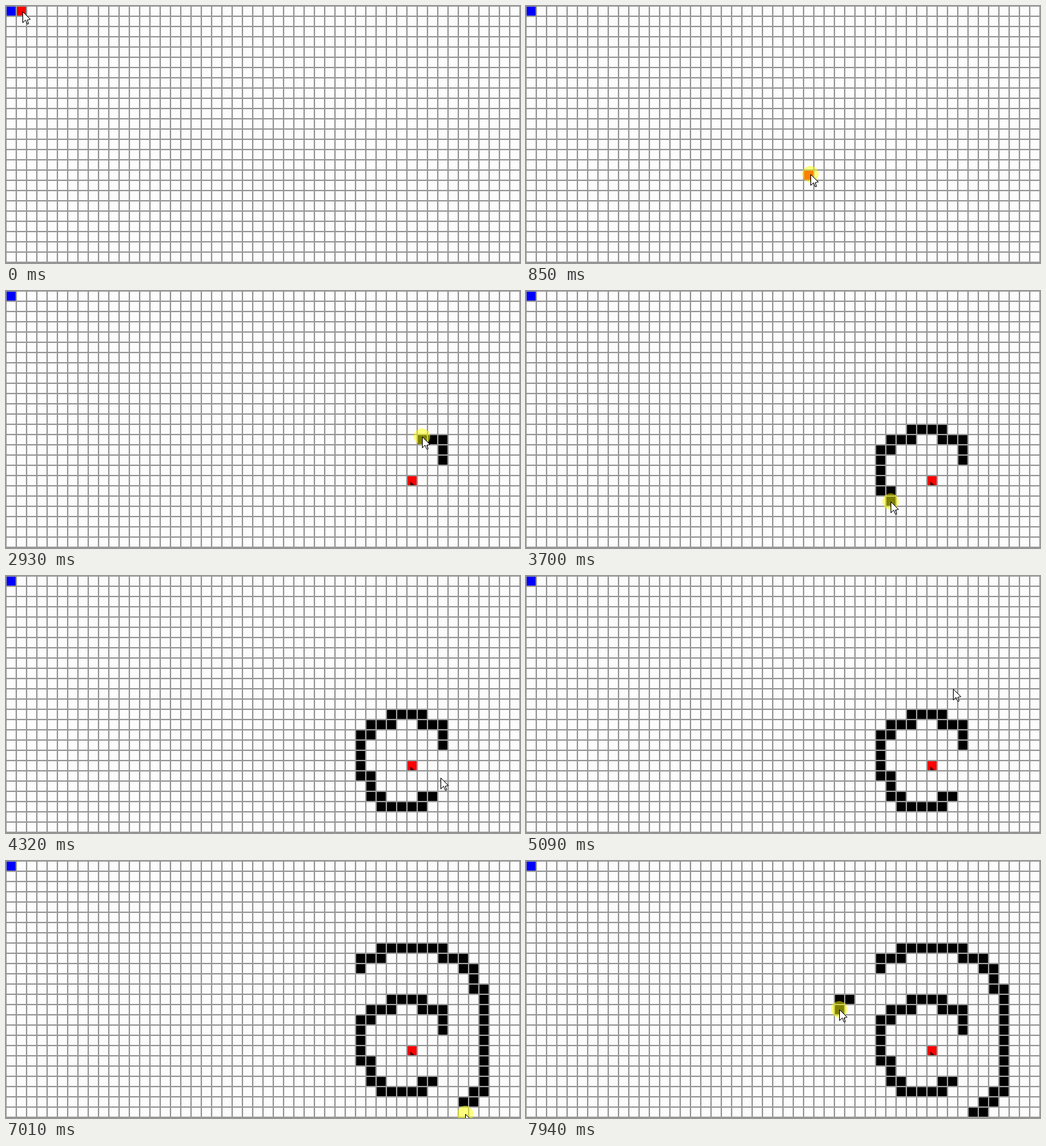
Write an HTML page with a canvas that moves like this. It is 750 px wide and 376 px high and loops after 8 s.

```html
<!DOCTYPE html>
<html lang="en">
<head>
<meta charset="utf-8">
<title>Grid drawing</title>
<style>
  html, body { margin: 0; width: 100%; height: 100%; overflow: hidden; background: #fdfcfd; }
  canvas { display: block; }
</style>
</head>
<body>
<canvas width="750" height="376"></canvas>
<script>
const canvas = document.querySelector('canvas');
const ctx = canvas.getContext('2d');
const LOOP = 8000, TICK = LOOP / 104, CELL = 15, DROP = 2160;
const STEP = { U: [0, -1], D: [0, 1], L: [-1, 0], R: [1, 0] };
const ARROW = new Path2D('M0 0V16L4 12L6.5 18L8.5 17.5L6.5 12L11 11Z');
const SPECK = new Path2D('M590 279L596 284H590Z');

const track = [], walls = [], presses = [];

function move(time, x, y) {
  track.push({ time, x, y });
}

function hold(time) {
  const { x, y } = track[track.length - 1];
  move(time, x, y);
}

// Draws walls at a steady pace; slip is the pointer's distance from cell centres.
function draw(from, to, col, row, path, slip = 0) {
  presses.push([from - 50, to + 60]);
  for (let i = 0; i <= path.length; i++) {
    if (i) {
      const [dx, dy] = STEP[path[i - 1]];
      col += dx;
      row += dy;
    }
    const time = from + (to - from) * i / path.length;
    walls.push({ time, col, row });
    move(time, (col + .5) * CELL + slip, (row + .5) * CELL + slip);
  }
}

// Drag the goal into place
presses.push([230, DROP]);
move(0, 24, 8);
hold(250);
move(846, 415, 246);
move(1000, 474, 261);
move(2000, 569, 274);
move(DROP - 10, 587, 279);
hold(2290);

// Inner ring
draw(2700, 4155, 42, 16, 'UULLULLLDLLDLDDDDRDDRDRRRRUR');
move(4770, 671, 212);
move(5077, 623, 165);

// Outer arc, slower towards its end
draw(5440, 6418, 34, 10, 'URRURRRRRRDRRDRDDRDDDDDDDD', 3.5);
draw(6418, 7100, 46, 20, 'DDLDLDL', 3);
hold(7300);

// Left side
draw(7765, 7920, 31, 13, 'LD');
hold(LOOP);

function pointerAt(time) {
  const i = Math.max(1, track.findIndex(p => p.time > time));
  const a = track[i - 1], b = track[i];
  const f = (time - a.time) / (b.time - a.time);
  return [a.x + (b.x - a.x) * f, a.y + (b.y - a.y) * f].map(Math.floor);
}

function fillCell(col, row, color) {
  ctx.fillStyle = color;
  ctx.fillRect(col * CELL + 1, row * CELL + 1, CELL - 2, CELL - 2);
}

function drawGrid() {
  ctx.fillStyle = '#fdfcfd';
  ctx.fillRect(0, 0, 750, 376);
  ctx.fillStyle = '#999';
  for (let x = 0; x <= 750; x += CELL) ctx.fillRect(x - 1, 0, 2, 376);
  for (let y = 0; y <= 375; y += CELL) ctx.fillRect(0, y - 1, 750, 2);
}

function drawPointer(x, y, pressed) {
  if (pressed) {
    ctx.fillStyle = 'rgba(255, 255, 0, .5)';
    ctx.beginPath();
    ctx.arc(x, y, 12, 0, Math.PI * 2);
    ctx.fill();
  }
  ctx.save();
  ctx.translate(x + .5, y + .5);
  ctx.fillStyle = '#fff';
  ctx.fill(ARROW);
  ctx.strokeStyle = '#000';
  ctx.stroke(ARROW);
  ctx.restore();
}

function render(ms) {
  const time = Math.floor((ms % LOOP) / TICK) * TICK;
  drawGrid();
  fillCell(0, 0, '#00f');

  const [goalCol, goalRow] = pointerAt(Math.min(time, DROP)).map(v => Math.floor(v / CELL));
  fillCell(goalCol, goalRow, '#f00');
  if (time > DROP) {
    ctx.fillStyle = '#300';
    ctx.fill(SPECK);
  }

  for (const wall of walls) {
    if (wall.time <= time) fillCell(wall.col, wall.row, '#000');
  }
  const pressed = presses.some(([from, to]) => time >= from && time < to);
  drawPointer(...pointerAt(time), pressed);
}

const begin = performance.now();
function loop() {
  render(performance.now() - begin);
  requestAnimationFrame(loop);
}
loop();
</script>
</body>
</html>
```
